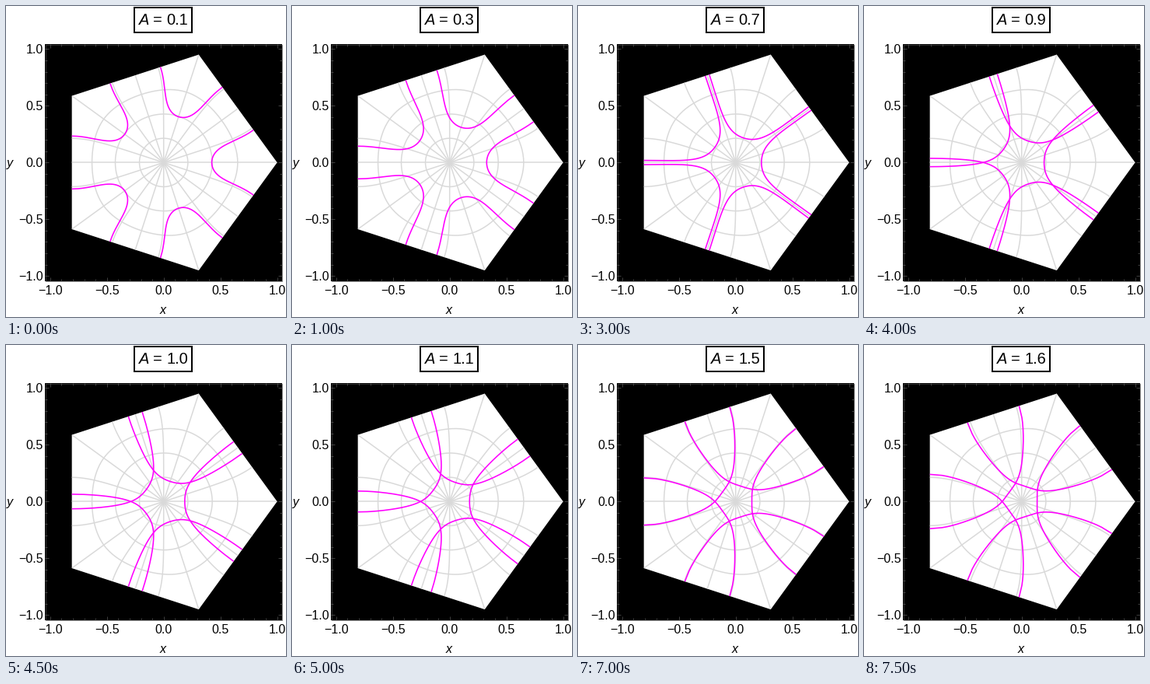
Recreate the animation shown at these times as a matplotlib script. Size 360 by 400 pixels, loop 8 s.

```python
import numpy as np
import matplotlib.pyplot as plt
from matplotlib.animation import FuncAnimation
from matplotlib.patches import Polygon, Rectangle

W, H, DPI = 360, 400, 100
PX = 72 / DPI                      # points per pixel
CX, CY, UNIT = 202.7, 201.3, 145.9  # plot origin and scale in pixels
L, T, R, B = 50, 49, 355, 354
FRAMES, STEP_MS = 16, 500

plt.rcParams["font.family"] = "Liberation Sans"
fig = plt.figure(figsize=(W / DPI, H / DPI), dpi=DPI, facecolor="white")
ax = fig.add_axes([0, 0, 1, 1])
ax.set_xlim(0, W)
ax.set_ylim(H, 0)
ax.axis("off")

# Series of the conformal map from the unit disk to the regular pentagon
n = np.arange(1, 400)
coef = np.concatenate(([1.0], np.cumprod((n - 0.6) / n))) / (5 * np.arange(400) + 1)
coef /= coef.sum()


def to_pentagon(z):
    return z * np.polyval(coef[::-1], z ** 5)


def to_px(w):
    return CX + UNIT * w.real, CY - UNIT * w.imag


def label(x, y, s, size=16, **kw):
    kw = {"ha": "center", "va": "baseline", **kw}
    return ax.text(x, y, s, fontsize=size * PX, color="black", **kw)


def tick(x, y, dx, dy):
    ax.plot([x, x + dx], [y, y + dy], color="0.4", lw=0.6 * PX, zorder=6,
            solid_capstyle="butt")


# Background and pentagon
ax.add_patch(Rectangle((L, T), R - L, B - T, fc="black", ec="none", zorder=1))
corners = np.exp(2j * np.pi * np.arange(5) / 5)
pentagon = Polygon(np.column_stack(to_px(corners)), fc="white", ec="none", zorder=2)
ax.add_patch(pentagon)


def inner_line(x, y, **kw):
    line, = ax.plot(x, y, solid_capstyle="butt", **kw)
    line.set_clip_path(pentagon)
    return line


# Polar grid carried into the pentagon
rad = np.linspace(0, 1, 80)
ring = np.exp(1j * np.linspace(0, 2 * np.pi, 241))
grid = [rad * np.exp(1j * np.pi * k / 10) for k in range(20)]
grid += [r * ring for r in (0.25, 0.5, 0.75)]
for z in grid:
    inner_line(*to_px(to_pentagon(z)), color="0.85", lw=1.5 * PX, zorder=3)

# Frame, ticks and labels
ax.add_patch(Rectangle((L + 0.5, T + 0.5), R - L - 1, B - T - 1, fc="none",
                       ec="0.3", lw=0.6 * PX, zorder=6))
for k in range(-10, 11):
    size = 5 if k % 5 == 0 else 3
    x, y = CX + UNIT * k / 10, CY - UNIT * k / 10
    tick(x, B, 0, -size)
    tick(x, T, 0, size)
    tick(L, y, size, 0)
    tick(R, y, -size, 0)
    if k % 5 == 0:
        s = f"{k / 10:.1f}".replace("-", "\u2212")
        label(x, 371, s)
        label(47.7, y + 5.5, s, ha="right")
label(202, 395.5, "x", style="italic")
label(4.5, 206.5, "y", style="italic")

# Boxed title
ax.add_patch(Rectangle((165, 2), 74, 31.5, fc="white", ec="black", lw=2 * PX))
label(171, 24, "A", 20, ha="left", style="italic")
label(194.5, 24, "=", 20)
value = label(206, 24, "", 20, ha="left")

curves = [inner_line([], [], color="#ff00ff", lw=1.6 * PX, zorder=4) for _ in corners]
phi = np.linspace(-np.pi / 2, np.pi / 2, 501)


def arc(a):
    """Arc in the disk around the positive real axis, normal to the rim."""
    depth = np.log(1.83 + 2.77 * a - 0.13 * np.exp(-4 * a))
    spread = 0.313 + 0.4155 * a - 0.106 * np.exp(-4.5 * a)
    u = depth * np.sqrt(np.abs(np.cos(phi)))
    return np.exp(-u + 1j * spread * np.sin(phi))


def update(i):
    a = (i + 1) / 10
    w = to_pentagon(arc(a))
    for line, c in zip(curves, corners):
        line.set_data(*to_px(w * c))
    value.set_text(f"{a:.1f}")
    return curves + [value]


anim = FuncAnimation(fig, update, frames=FRAMES, interval=STEP_MS,
                     repeat=True, repeat_delay=0, blit=False)
plt.show()
```
